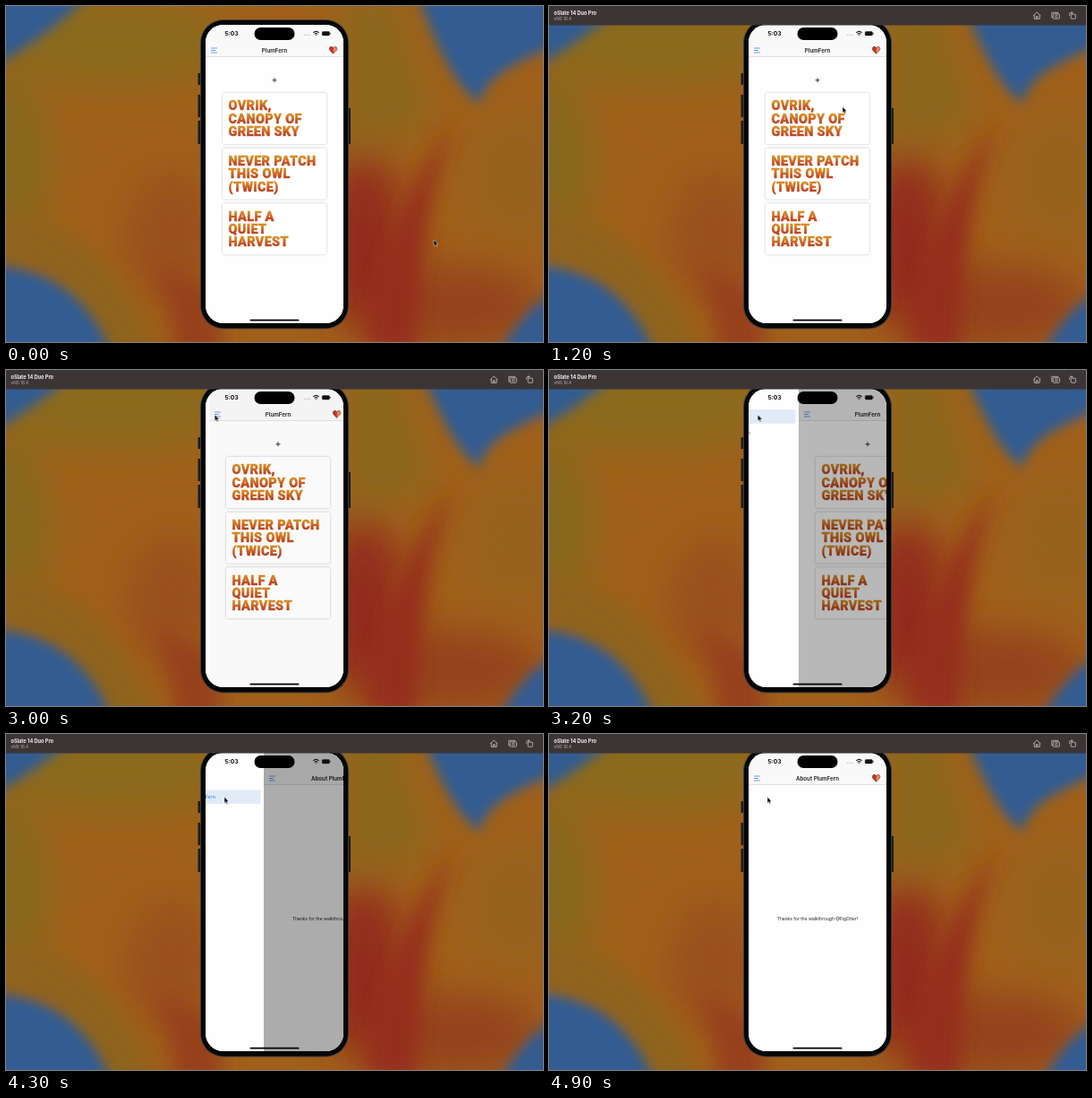
Recreate the animation shown at these times as an HTML page. Size 600 by 375 pixels, loop 5000 ms.

```html
<!DOCTYPE html>
<html lang="en">
<head>
<meta charset="utf-8">
<title>Phone drawer demo</title>
<style>
@property --open { syntax: "<number>"; inherits: true; initial-value: 0; }

html, body { margin: 0; width: 100%; height: 100%; overflow: hidden; background: #a0601b; }
svg { display: block; width: 100vw; height: 100vh; }
text { font-family: Inter, "Liberation Sans", sans-serif; }

.mid { text-anchor: middle; }
.title { font-size: 6.2px; font-weight: 600; fill: #1c1c1e; }
.card rect { fill: #fff; filter: drop-shadow(.3px .5px .8px #0004); }
.card text {
  font: 900 14.4px Roboto, "Liberation Sans", sans-serif;
  letter-spacing: .35px;
  fill: url(#fire); stroke: url(#fire); stroke-width: .4px;
}
.item { font-size: 5.2px; font-weight: 500; }

/* one 5 s clock; 2% is one 100 ms step */
.stage *, .bar { animation: 5s step-end infinite; }
.bar { animation-name: bar; }
.cursor { animation-name: cursor; }
.screen { animation-name: drawer; }
.stage .home { animation-name: home; }
.stage .about { animation-name: about; }
.stage .mark { animation-name: mark; }
.stage .first { animation-name: first; }
.stage .second { animation-name: second; }

.page { transform: translateX(calc(var(--open) * 1px)); }
.drawer { transform: translateX(calc(var(--open) * 1px - 100px)); }
.dim { opacity: calc(var(--open) / 200); }

@keyframes bar {
  0% { opacity: 0 } 2% { opacity: .2 } 4% { opacity: .5 } 6% { opacity: .78 }
  8% { opacity: .93 } 10%, 100% { opacity: 1 }
}
@keyframes drawer {
  0% { --open: 0 } 60% { --open: 4 } 62% { --open: 27 } 64% { --open: 56 }
  68% { --open: 82 } 70% { --open: 93 } 72% { --open: 98 } 74% { --open: 99.5 }
  76% { --open: 100 } 84% { --open: 92 } 86% { --open: 65 } 88% { --open: 34 }
  90% { --open: 15 } 92% { --open: 5 } 94%, 100% { --open: 0 }
}
@keyframes home { 0% { visibility: visible } 84%, 100% { visibility: hidden } }
@keyframes about { 0% { visibility: hidden } 84%, 100% { visibility: visible } }
@keyframes mark { 0% { transform: none } 84%, 100% { transform: translateY(18.4px) } }
@keyframes first { 0% { fill: #3b80d6 } 84%, 100% { fill: #555 } }
@keyframes second { 0% { fill: #555 } 84%, 100% { fill: #3b80d6 } }
@keyframes cursor {
  0% { transform: translate(478px, 261px) }
  2% { transform: translate(476px, 257px) }
  4% { transform: translate(468px, 243px) }
  6% { transform: translate(458px, 226px) }
  8% { transform: translate(448px, 207px) }
  10% { transform: translate(439px, 192px) }
  12% { transform: translate(432px, 178px) }
  14% { transform: translate(424px, 165px) }
  16% { transform: translate(421px, 158px) }
  20% { transform: translate(405px, 148px) }
  22% { transform: translate(366px, 128px) }
  24% { transform: translate(328px, 112.5px) }
  26% { transform: translate(303px, 100px) }
  28% { transform: translate(287px, 91px) }
  30% { transform: translate(280px, 87px) }
  38% { transform: translate(276px, 85px) }
  40% { transform: translate(269px, 80px) }
  42% { transform: translate(260px, 74px) }
  44% { transform: translate(250.7px, 67.5px) }
  46% { transform: translate(243px, 60px) }
  48% { transform: translate(236px, 54px) }
  50% { transform: translate(234px, 51px) }
  52% { transform: translate(233.3px, 50px) }
  70% { transform: translate(236px, 56px) }
  72% { transform: translate(240px, 64px) }
  74% { transform: translate(243px, 69px) }
  76%, 100% { transform: translate(244px, 70.3px) }
}
</style>
</head>
<body>
<svg class="stage" viewBox="0 0 600 375" preserveAspectRatio="none">
  <defs>
    <linearGradient id="fire" x2="0" y2="1">
      <stop offset=".2" stop-color="#d98c25"/>
      <stop offset=".5" stop-color="#cd5d20"/>
      <stop offset=".82" stop-color="#b5381d"/>
    </linearGradient>
    <linearGradient id="heart">
      <stop offset=".45" stop-color="#c8322b"/>
      <stop offset=".6" stop-color="#e58a5c"/>
    </linearGradient>
    <filter id="soft" x="-50%" y="-50%" width="200%" height="200%"><feGaussianBlur stdDeviation="22"/></filter>
    <filter id="fold" x="-50%" y="-50%" width="200%" height="200%"><feGaussianBlur stdDeviation="11"/></filter>
    <filter id="edge" x="-30%" y="-30%" width="160%" height="160%"><feGaussianBlur stdDeviation="7"/></filter>
    <clipPath id="glass"><rect x="223" y="21" width="154" height="333" rx="20"/></clipPath>
    <g id="menu" fill="none" stroke="#5c92f2" stroke-width=".9">
      <path d="M229 47h7M229 49.5h5M229 52h7"/>
    </g>
  </defs>

  <!-- soft petal backdrop -->
  <rect width="600" height="375" fill="#a0601b"/>
  <g filter="url(#soft)">
    <ellipse cx="120" cy="40" rx="130" ry="50" fill="#8a6a1c"/>
    <ellipse cx="0" cy="170" rx="50" ry="95" fill="#87691b"/>
    <ellipse cx="185" cy="260" rx="50" ry="75" fill="#9a4f1b"/>
    <path d="M375-20H435Q455 70 480 130L380 160Z" fill="#8a681b"/>
    <ellipse cx="570" cy="190" rx="60" ry="75" fill="#97621b"/>
    <ellipse cx="500" cy="335" rx="100" ry="45" fill="#94431b"/>
    <ellipse cx="400" cy="265" rx="45" ry="100" fill="#922c1b"/>
  </g>
  <g filter="url(#fold)">
    <path d="M-20 225Q110 235 175 400H110Q90 300-20 275Z" fill="#8f641b"/>
    <path d="M165 290Q185 330 190 400H240V320Z" fill="#973f1b"/>
    <path d="M400 375Q420 240 500 130 455 250 460 395Z" fill="#952f1b"/>
  </g>
  <g filter="url(#edge)" fill="#315c92">
    <path d="M-20-20H100Q60 25-20 72Z"/>
    <path d="M458-20Q478 45 508 88L528 110Q535 85 560 70T625 40V-20Z"/>
    <path d="M-20 288Q45 292 80 328T118 400H-20Z"/>
    <path d="M625 312Q575 335 545 400H625Z"/>
  </g>

  <!-- phone body -->
  <g fill="#1b1c1f">
    <path d="M214.5 75h3v13h-3zM214.5 99h3v25h-3zM214.5 128h3v26h-3zM382.5 114h2.5v40h-2.5z"/>
    <rect x="217" y="15" width="166" height="345.5" rx="26" fill="#3b3c3e"/>
    <rect x="218" y="16" width="164" height="343.5" rx="25" fill="#050506"/>
  </g>

  <g class="screen" clip-path="url(#glass)">
    <rect x="223" y="21" width="154" height="333" fill="#fefefe"/>
    <g class="page">
      <rect x="223" y="21" width="154" height="333" fill="#fefefe"/>
      <rect x="223" y="21" width="154" height="35.5" fill="#f9f9fa"/>
      <path d="M223 56.5h154" stroke="#d8d8da" stroke-width=".7"/>
      <use href="#menu"/>
      <path d="M365.5 53.4 361.6 49.2Q360.5 46.6 362.5 45.5 364.4 44.8 365.6 46.6 367 44.7 368.9 45.6 370.7 46.8 369.6 49.2Z" fill="url(#heart)" stroke="#6b2a20" stroke-width=".5"/>

      <g class="home">
        <text class="title mid" x="300" y="51.6">PlumFern</text>
        <path d="M300 80.3v5M297.5 82.8h5" stroke="#222" stroke-width=".9"/>
        <g class="card">
          <rect x="242" y="97" width="116" height="57" rx="2"/>
          <text x="248.5" y="116.4">OVRIK,</text>
          <text x="248.5" y="130.7">CANOPY OF</text>
          <text x="248.5" y="145">GREEN SKY</text>
        </g>
        <g class="card" transform="translate(0 61.7)">
          <rect x="242" y="97" width="116" height="57" rx="2"/>
          <text x="248.5" y="116.4">NEVER PATCH</text>
          <text x="248.5" y="130.7">THIS OWL</text>
          <text x="248.5" y="145">(TWICE)</text>
        </g>
        <g class="card" transform="translate(0 123.3)">
          <rect x="242" y="97" width="116" height="57" rx="2"/>
          <text x="248.5" y="116.4">HALF A</text>
          <text x="248.5" y="130.7">QUIET</text>
          <text x="248.5" y="145">HARVEST</text>
        </g>
      </g>

      <g class="about">
        <text class="title mid" x="300" y="51.6">About PlumFern</text>
        <text class="mid" x="300" y="207.6" font-size="4.95" fill="#222">Thanks for the walkthrough @FigOtter!</text>
      </g>
      <rect class="dim" x="223" y="21" width="154" height="333"/>
    </g>

    <g class="drawer">
      <rect x="223" y="21" width="100" height="333" fill="#fefefe"/>
      <rect class="mark" x="227" y="44.3" width="92.5" height="15.5" rx="1" fill="#e1ebf7"/>
      <text class="item first" x="229" y="54">PlumFern</text>
      <text class="item second" x="229" y="72.3">About PlumFern</text>
    </g>

    <!-- status bar -->
    <text class="mid" x="252" y="33.3" font-size="6.8" font-weight="600">5:03</text>
    <path d="M333 32.3h7" stroke="#aaa" stroke-dasharray="1 1"/>
    <g fill="none" stroke="#111">
      <path d="M343.3 29.8q3.2-2.8 6.4 0M344.7 31.3q1.8-1.5 3.6 0" stroke-width="1.1"/>
      <circle cx="346.5" cy="32.5" r=".4" stroke-width=".6"/>
      <rect x="353.2" y="28.5" width="8.3" height="4.4" rx="1.2" fill="#111" stroke-width=".4"/>
      <path d="M362.5 30v1.4" stroke-width=".7"/>
    </g>
    <rect x="277.5" y="24" width="45" height="14" rx="7"/>
    <rect x="272.5" y="349.8" width="55" height="1.8" rx=".9"/>
  </g>

  <!-- window bar -->
  <g class="bar">
    <rect width="600" height="21.5" fill="#3c3536"/>
    <text x="5.5" y="10" font-size="5.6" font-weight="700" fill="#f4f2f2">oSlate 14 Duo Pro</text>
    <text x="5.5" y="16.3" font-size="4.7" fill="#b9b4b4">vNS 16.4</text>
    <g fill="none" stroke="#c9c4c4" stroke-width=".8" stroke-linejoin="round">
      <path d="M541 10.8 545.2 7 549.4 10.8M542.2 10v4.3h6V10M544.4 14.2v-2.6h1.6v2.6"/>
      <path d="M563 12.7h-1.2V7.3h6.8v1.4"/>
      <rect x="563.2" y="8.8" width="7.2" height="5.4" rx=".8"/>
      <circle cx="566.8" cy="11.5" r="1.3"/>
      <rect x="583.2" y="9.2" width="5.2" height="5" rx=".6"/>
      <path d="M581.7 10.8V8.6q0-1 1-1h2.2M583.7 6.2 585 7.6 583.7 9"/>
    </g>
  </g>

  <path class="cursor" d="M0 0V6.7L1.5 5.4 2.6 7.8 3.8 7.3 2.7 4.9H4.8Z" fill="#000" stroke="#fff" stroke-width=".45"/>
</svg>
</body>
</html>
```
